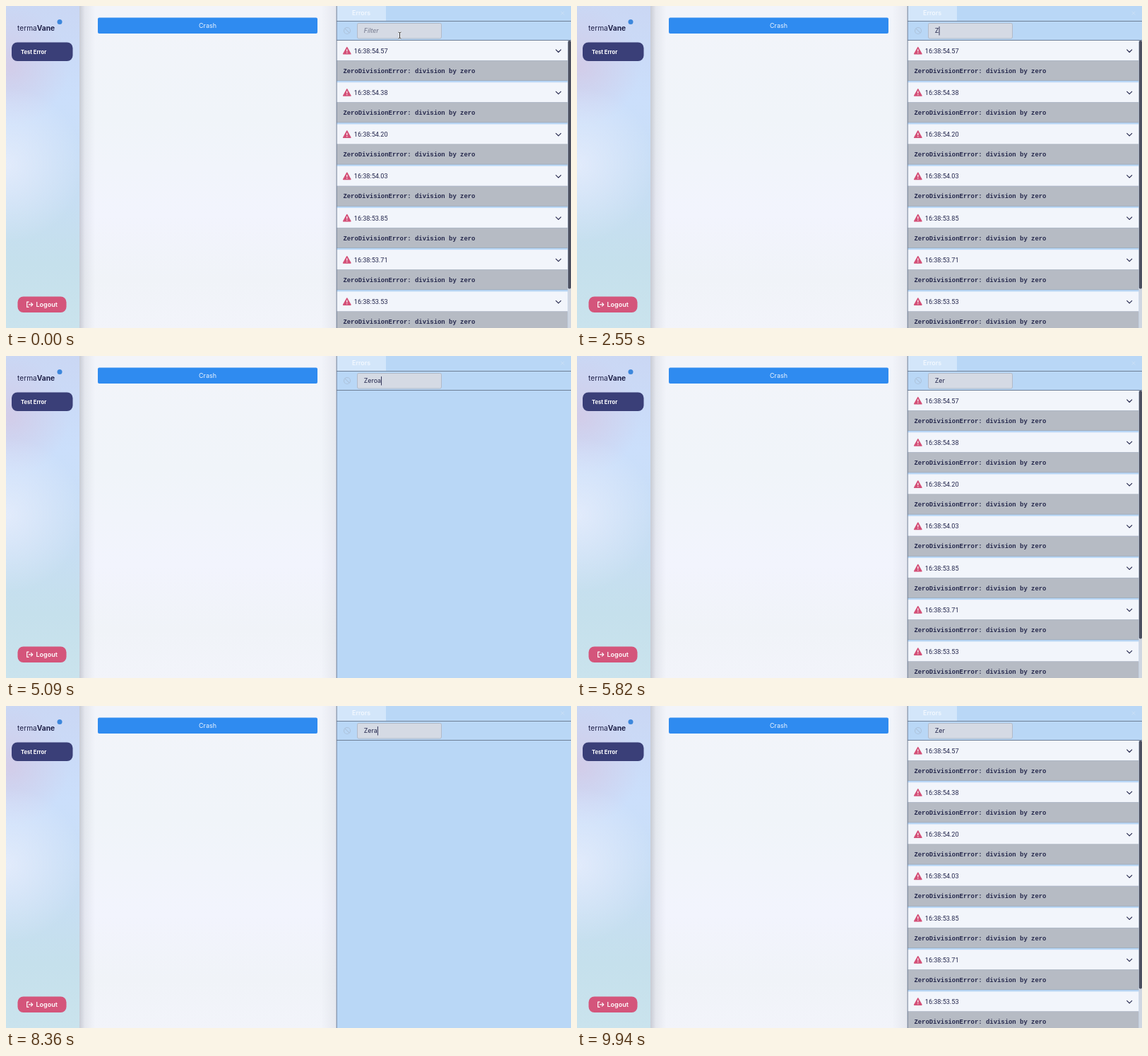
These frames come from a looping animation (800 px wide and 456 px high, 9.97 s). An HTML page with a canvas:

```html
<!DOCTYPE html>
<html lang="en">
<head>
<meta charset="utf-8">
<title>Error filter</title>
<style>
  html, body { margin: 0; width: 100%; height: 100%; overflow: hidden; background: #f1f4fa; }
  canvas { display: block; width: 800px; height: 456px; }
</style>
</head>
<body>
<canvas id="stage"></canvas>
<script>
const W = 800, H = 456, LOOP = 9970;
const canvas = document.getElementById('stage');
const ctx = canvas.getContext('2d');
const scale = window.devicePixelRatio || 1;
canvas.width = W * scale;
canvas.height = H * scale;

const INK = '#20234a', PANEL = '#b9d7f6', LINE = '#66758c', PINK = '#d45078';
const SANS = 'Inter, sans-serif', DIGITS = 'Roboto, sans-serif';
const MONO = '"Liberation Mono", monospace';
const TIMES = ['54.57', '54.38', '54.20', '54.03', '53.85', '53.71', '53.53'];
const ROW_TOP = 49, ROW_PITCH = 59.23;

const FOCUS_AT = 900, BLINK = 500, FILTER_DELAY = 250;
const EDITS = [
  [0, ''], [2400, 'Z'], [2600, 'Ze'], [2750, 'Zer'], [2920, 'Zero'],
  [4600, 'Zeroa'], [5100, 'Zero'], [5250, 'Zer'], [7900, 'Zera'], [9000, 'Zer'],
];

const lastEdit = t => EDITS.filter(([at]) => at <= t).pop() || EDITS[0];

function rect(x, y, w, h, fill) {
  ctx.fillStyle = fill;
  ctx.fillRect(x, y, w, h);
}

function rounded(x, y, w, h, r, fill, stroke) {
  ctx.beginPath();
  ctx.roundRect(x, y, w, h, r);
  ctx.fillStyle = fill;
  ctx.fill();
  if (stroke) {
    ctx.strokeStyle = stroke;
    ctx.lineWidth = 1;
    ctx.stroke();
  }
}

function line(points, color, width = 1) {
  ctx.beginPath();
  points.forEach(([x, y]) => ctx.lineTo(x, y));
  ctx.strokeStyle = color;
  ctx.lineWidth = width;
  ctx.stroke();
}

function text(str, x, baseline, font, fill, align = 'left') {
  ctx.font = font;
  ctx.fillStyle = fill;
  ctx.textAlign = align;
  ctx.fillText(str, x, baseline);
  return ctx.measureText(str).width;
}

function withStops(gradient, stops) {
  stops.forEach(([at, color]) => gradient.addColorStop(at, color));
  return gradient;
}

const linear = (x0, y0, x1, y1, ...stops) =>
  withStops(ctx.createLinearGradient(x0, y0, x1, y1), stops);

const glow = (x, y, r, rgb, alpha) =>
  withStops(ctx.createRadialGradient(x, y, 0, x, y, r),
    [[0, `rgba(${rgb},${alpha})`], [1, `rgba(${rgb},0)`]]);

function drawMain() {
  rect(104, 0, 364, H, linear(0, 0, 0, H,
    [0, '#f2f4fa'], [0.35, '#f0f4f9'], [0.65, '#f2f4fd'], [0.85, '#f0f3f8'], [1, '#f2f4fa']));
  rect(104, 0, 22, H, linear(104, 0, 126, 0,
    [0, 'rgba(70,75,95,.24)'], [0.35, 'rgba(70,75,95,.08)'], [1, 'rgba(70,75,95,0)']));
  rect(446, 0, 22, H, linear(446, 0, 468, 0,
    [0, 'rgba(70,75,95,0)'], [1, 'rgba(70,75,95,.07)']));
  rounded(130, 16.5, 311, 22.5, 2, '#2f8bf0');
  text('Crash', 285.5, 31.2, `9px ${SANS}`, '#eef5fe', 'center');
}

function drawSidebar() {
  rect(0, 0, 104, H, linear(0, 0, 0, H,
    [0, '#cad7f4'], [0.3, '#cbdffb'], [0.6, '#c7def3'], [0.8, '#c5e0ec'], [1, '#cae3ed']));
  rect(0, 0, 104, H, glow(5, 85, 85, '214,196,224', 0.65));
  rect(0, 0, 104, H, glow(0, 225, 110, '232,238,253', 0.8));

  const start = text('terma', 16, 35.2, `10.2px ${SANS}`, INK);
  text('Vane', 16 + start, 35.2, `bold 10.2px ${SANS}`, INK);
  ctx.beginPath();
  ctx.arc(76, 22.5, 3.5, 0, Math.PI * 2);
  ctx.fillStyle = '#3c87dc';
  ctx.fill();

  rounded(8, 51.5, 86.5, 26.5, 8, '#3a3f78');
  text('Test Error', 21, 67.5, `bold 7.6px ${SANS}`, '#fff');

  rounded(16.5, 411.5, 69, 22.5, 8, '#d4557b');
  text('Logout', 42.5, 426, `600 9px ${SANS}`, '#fff');
  line([[32.5, 419.2], [29.7, 419.2], [29.7, 426.3], [32.5, 426.3]], '#fff', 1.2);
  line([[32, 422.8], [37.5, 422.8]], '#fff', 1.2);
  line([[35.2, 420.2], [37.8, 422.8], [35.2, 425.4]], '#fff', 1.2);
}

function drawRow(time, y) {
  rect(468, y, 327.5, 28.5, '#f2f5fb');
  rect(468, y + 28.5, 327.5, 28.3, '#b6bbc4');
  rect(468, y + 28, 327.5, 0.7, '#a4acba');
  rect(468, y + 56.3, 327.5, 0.7, '#98a6b8');

  ctx.beginPath();
  ctx.moveTo(482.8, y + 9.5);
  ctx.lineTo(488, y + 18.8);
  ctx.lineTo(477.6, y + 18.8);
  ctx.closePath();
  ctx.fillStyle = ctx.strokeStyle = PINK;
  ctx.lineJoin = 'round';
  ctx.lineWidth = 1.4;
  ctx.fill();
  ctx.stroke();
  line([[482.8, y + 12.2], [482.8, y + 15.5]], '#fff', 1.2);
  rect(482.2, y + 16.7, 1.2, 1.2, '#fff');

  text('16:38:' + time, 492.8, y + 17.8, `9.1px ${DIGITS}`, INK);
  line([[778.4, y + 12.7], [782.2, y + 16.5], [786, y + 12.7]], INK, 1.1);
  text('ZeroDivisionError: division by zero', 477.4, y + 45.6, `bold 8.91px ${MONO}`, '#25284c');
}

function drawPointer(x, y) {
  const shape = [[x - 2, y - 4.5], [x, y - 3.6], [x + 2, y - 4.5]];
  const foot = [[x - 2, y + 4.5], [x, y + 3.6], [x + 2, y + 4.5]];
  const stem = [[x, y - 3.6], [x, y + 3.6]];
  [shape, foot, stem].forEach(part => line(part, '#fff', 2));
  [shape, foot, stem].forEach(part => line(part, '#222', 0.9));
}

function drawFilter(t) {
  const [editedAt, value] = lastEdit(t);
  rounded(497.5, 24.5, 119, 21.5, 2, '#d5dae4', '#b2bac8');
  let width = 0;
  if (value) width = text(value, 506.8, 38.3, `8.8px ${SANS}`, INK);
  else text('Filter', 506.8, 38.3, `italic 8.8px ${SANS}`, '#70758a');

  const since = t - Math.max(editedAt, FOCUS_AT);
  if (since >= 0 && since % (2 * BLINK) < BLINK) rect(507 + width, 29, 0.9, 12.5, INK);
  if (!value) drawPointer(557.5, 41.5);
}

function drawPanel(t) {
  rect(468, 0, 332, H, PANEL);
  rect(468, 0, 70, 21, '#d3e6fa');
  text('Errors', 490, 13.4, `500 9px ${SANS}`, '#f6faff');
  line([[785.6, 7.8], [790.4, 12.6]], '#cbdff5');
  line([[790.4, 7.8], [785.6, 12.6]], '#cbdff5');

  ctx.beginPath();
  ctx.arc(483, 35, 4.5, 0, Math.PI * 2);
  ctx.strokeStyle = '#adc3dc';
  ctx.lineWidth = 1.1;
  ctx.stroke();
  line([[479.8, 31.8], [486.2, 38.2]], '#adc3dc', 1.1);
  drawFilter(t);

  const query = lastEdit(t - FILTER_DELAY)[1];
  if ('ZeroDivisionError: division by zero'.includes(query)) {
    TIMES.forEach((time, i) => drawRow(time, ROW_TOP + i * ROW_PITCH));
    rect(795.5, 49, 4.5, H - 49, '#cfd6e1');
    rounded(795.8, 49, 4.2, 351.5, 2, '#4c5060');
  }
  rect(468, 21, 332, 0.9, LINE);
  rect(468, 48, 332, 0.9, LINE);
  rect(467.7, 0, 0.9, H, LINE);
}

function frame(now) {
  const t = now % LOOP;
  ctx.setTransform(scale, 0, 0, scale, 0, 0);
  drawMain();
  drawSidebar();
  drawPanel(t);
  requestAnimationFrame(frame);
}
requestAnimationFrame(frame);
</script>
</body>
</html>
```
